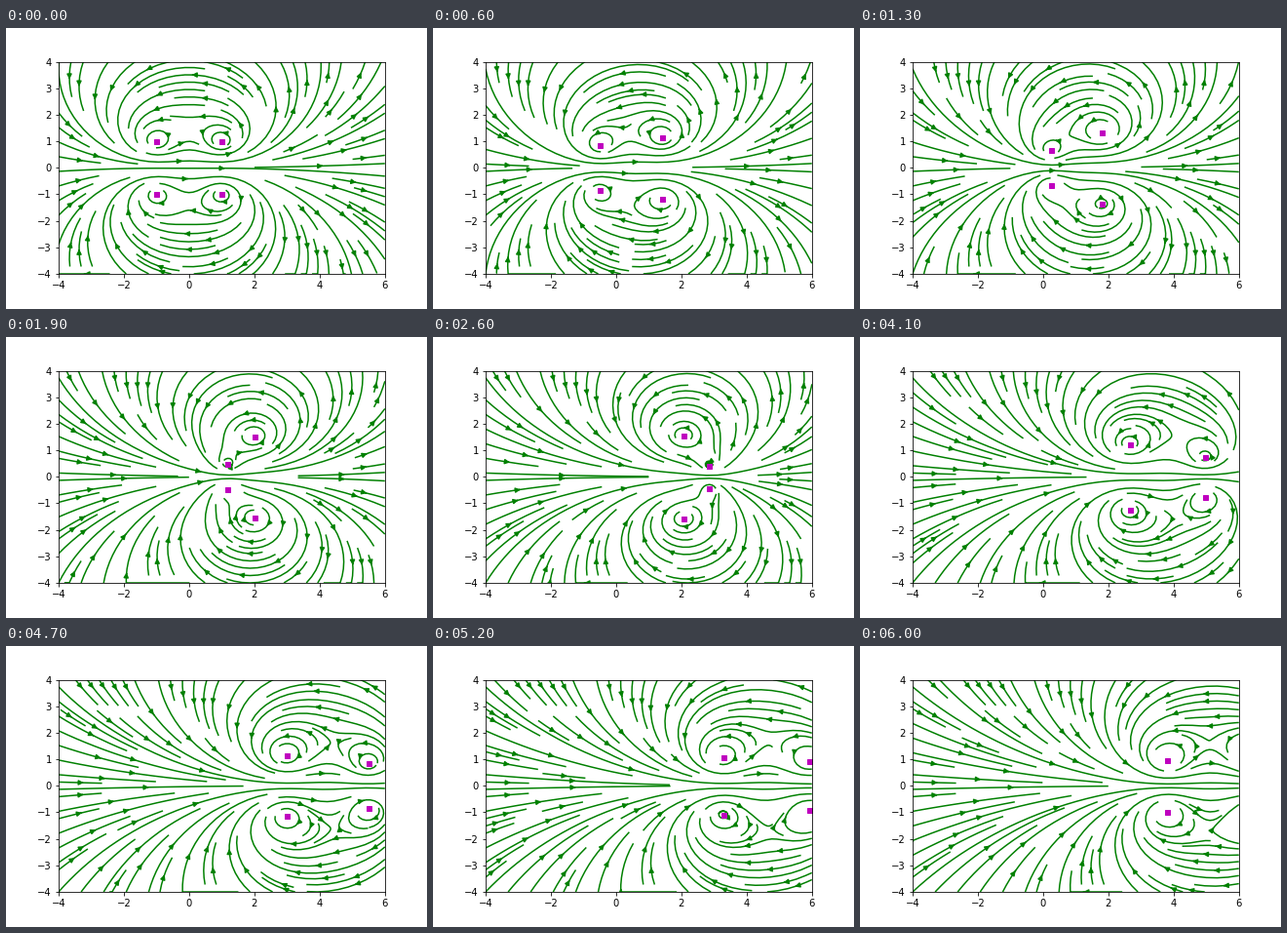
These frames come from a looping animation (432x288 px, 6100 ms). A matplotlib script:

```python
"""Two vortex pairs leapfrogging, shown with evenly spaced streamlines."""
from math import hypot, inf

import matplotlib.pyplot as plt
import numpy as np
from matplotlib.animation import FuncAnimation
from matplotlib.collections import LineCollection
from matplotlib.patches import FancyArrowPatch

FRAMES, INTERVAL = 61, 100
STEP = 0.1                       # time step of the vortex motion
X0, Y0, WIDTH, HEIGHT = -4, -4, 10, 8
SAMPLES = 1000                   # field samples per side
PERIOD = SAMPLES / (SAMPLES - 1)
CELLS = 30                       # occupancy cells per side
PITCH = PERIOD / (CELLS - 1)     # distance between cell centres
MAX_DS, MAX_ERROR = 1 / CELLS, 0.003
MIN_LENGTH, MAX_LENGTH = 0.1, 2.0
START = [-1 + 1j, -1 - 1j, 1 + 1j, 1 - 1j]
SPIN = [1, -1, 1, -1]


def vortex_paths():
    """Positions of all vortices in every frame, by Euler steps."""
    paths = [START]
    while len(paths) < FRAMES:
        now = paths[-1]
        paths.append([
            z + STEP * sum(-1j * k / (z - c) for c, k in zip(now, SPIN)
                           if c != z).conjugate()
            for z in now])
    return paths


def spiral_cells():
    """Cells from the border inwards, anticlockwise."""
    left, bottom, right, top = 0, 1, CELLS - 1, CELLS - 1
    x = y = 0
    heading = "right"
    for _ in range(CELLS * CELLS):
        yield x, y
        if heading == "right":
            x += 1
            if x >= right:
                right -= 1
                heading = "up"
        elif heading == "up":
            y += 1
            if y >= top:
                top -= 1
                heading = "left"
        elif heading == "left":
            x -= 1
            if x <= left:
                left += 1
                heading = "down"
        else:
            y -= 1
            if y <= bottom:
                bottom += 1
                heading = "right"


def inside(x, y):
    return 0 <= x <= 1 and 0 <= y <= 1


def wrap(p):
    """The sampled field repeats past its lower and left borders."""
    return p + PERIOD if p <= 1 - PERIOD else p


class Streamlines:
    """Traces streamlines in unit-square coordinates, one per free cell."""

    def __init__(self, centres):
        self.vortices = list(zip(centres, SPIN))
        self.taken = set()
        self.trail = []
        self.cell = None

    def direction(self, x, y, sign):
        z = complex(X0 + WIDTH * wrap(x), Y0 + HEIGHT * wrap(y))
        w = 0j
        for c, k in self.vortices:
            w += k / (z - c)
        u, v = w.imag / WIDTH, w.real / HEIGHT
        speed = sign * hypot(u, v)
        return u / speed, v / speed

    def enter(self, x, y):
        """Claim the cell at a point; False if another line holds it."""
        cell = int(x / PITCH + 0.5), int(y / PITCH + 0.5)
        if cell != self.cell:
            if cell in self.taken:
                return False
            self.taken.add(cell)
            self.trail.append(cell)
            self.cell = cell
        return True

    def to_edge(self, points, sign):
        """Extend a line straight to the border; return the added length."""
        x, y = points[-1]
        cx, cy = self.direction(x, y, sign)
        reach = [inf if c == 0 else -p / c if c < 0 else (1 - p) / c
                 for p, c in ((x, cx), (y, cy))]
        ds = min(reach)
        points.append((x + cx * ds, y + cy * ds))
        return ds

    def integrate(self, x, y, sign):
        """Adaptive second-order steps along or against the flow."""
        ds, total, points = MAX_DS, 0.0, []
        while inside(x, y):
            points.append((x, y))
            u1, v1 = self.direction(x, y, sign)
            nx, ny = x + ds * u1, y + ds * v1
            if max(nx, ny) > 1:
                total += self.to_edge(points, sign)
                break
            u2, v2 = self.direction(nx, ny, sign)
            error = ds / 2 * hypot(u2 - u1, v2 - v1)
            if error < MAX_ERROR:
                x += ds / 2 * (u1 + u2)
                y += ds / 2 * (v1 + v2)
                if not inside(x, y) or not self.enter(x, y):
                    break
                if total + ds > MAX_LENGTH:
                    break
                total += ds
            ds = MAX_DS if error == 0 else min(
                MAX_DS, 0.85 * ds * (MAX_ERROR / error) ** 0.5)
        return total, points

    def trace(self):
        lines = []
        for start in spiral_cells():
            if start in self.taken:
                continue
            x, y = (i * PITCH for i in start)
            self.trail = []
            self.enter(x, y)
            back, before = self.integrate(x, y, -1)
            self.cell = start
            ahead, after = self.integrate(x, y, 1)
            if back + ahead > MIN_LENGTH:
                points = np.array(before[::-1] + after[1:])
                lines.append(points * (WIDTH, HEIGHT) + (X0, Y0))
            else:
                self.taken.difference_update(self.trail)
        return lines


def arrow(line):
    """Arrow head halfway along a streamline."""
    length = np.cumsum(np.hypot(*np.diff(line, axis=0).T))
    n = np.searchsorted(length, length[-1] / 2)
    return FancyArrowPatch(line[n], line[n:n + 2].mean(axis=0),
                           transform=ax.transData, arrowstyle="-|>",
                           mutation_scale=10, color="green", lw=1.5, zorder=2)


fig = plt.figure(figsize=(6, 4), dpi=72, facecolor="white")
fig.subplots_adjust(left=0.125, right=0.9, bottom=0.125, top=0.88)
ax = fig.add_subplot()
ax.set_xlim(X0, X0 + WIDTH)
ax.set_ylim(Y0, Y0 + HEIGHT)
flow = ax.add_collection(LineCollection([], colors="green", linewidths=1.5,
                                        zorder=2), autolim=False)
dots, = ax.plot([], [], "ms", ms=5, zorder=2.2)
paths = vortex_paths()
arrows = []


def update(frame):
    centres = paths[frame]
    lines = Streamlines(centres).trace()
    flow.set_segments(lines)
    while arrows:
        arrows.pop().remove()
    arrows.extend(ax.add_artist(arrow(line)) for line in lines)
    dots.set_data([z.real for z in centres], [z.imag for z in centres])
    return [flow, dots, *arrows]


anim = FuncAnimation(fig, update, frames=FRAMES, interval=INTERVAL,
                     init_func=lambda: [], repeat=True, repeat_delay=0)
plt.show()
```
